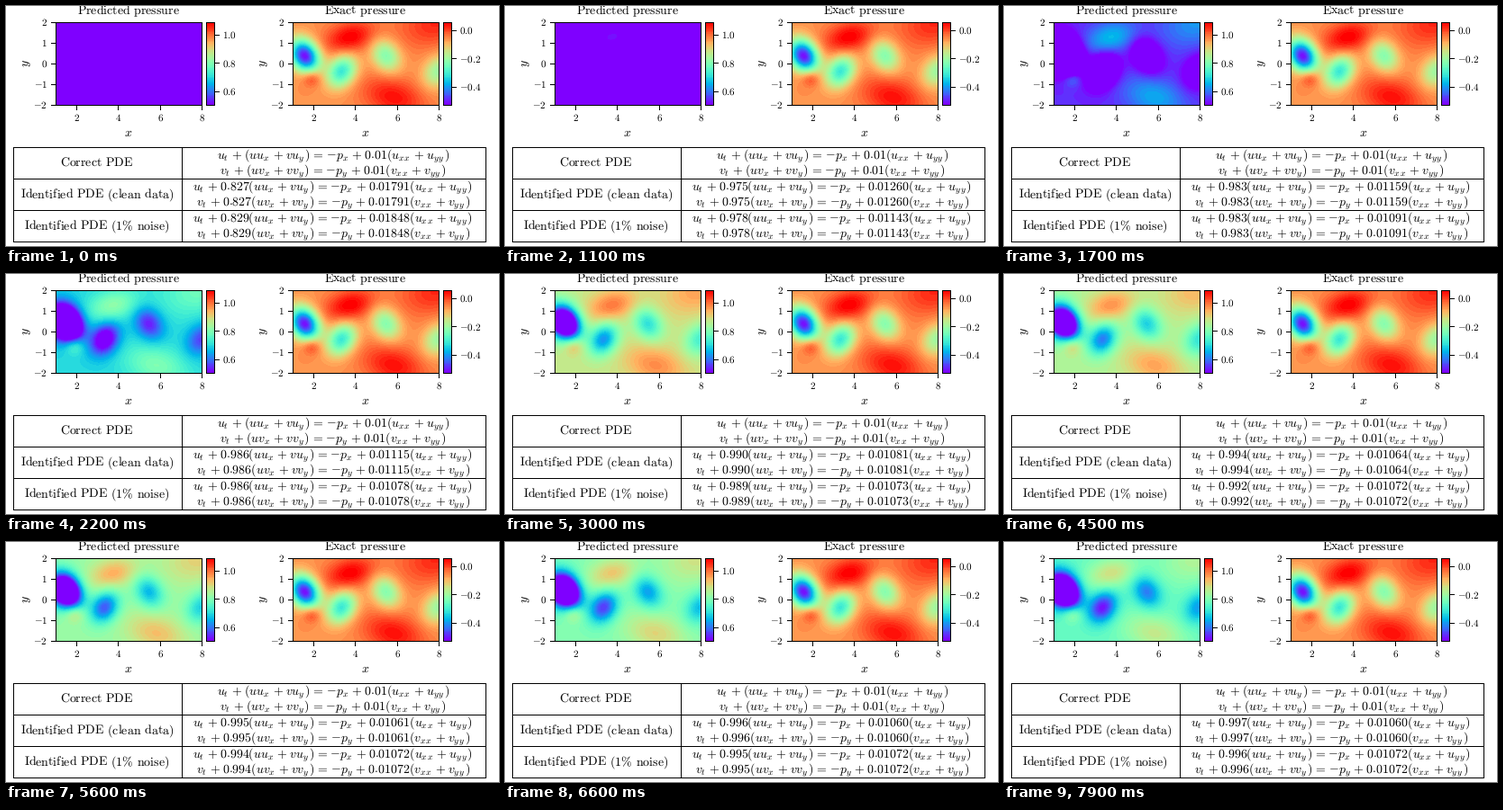
A matplotlib script for the animation above (8000 ms loop, 547x267 px).

```python
import numpy as np
import matplotlib.pyplot as plt
from matplotlib.animation import FuncAnimation

W, H, DPI = 547, 267, 100
FRAMES, STEP = 80, 100
BIG, SMALL = 10, 8
LINE = 72 / DPI
SHIFT = 263  # distance between the two panels
LEFT, RIGHT, TOP, BOTTOM = 55, 217, 18, 110
ROW = 35

plt.rcParams.update({"mathtext.fontset": "cm", "text.hinting": "no_hinting"})
fig = plt.figure(figsize=(W / DPI, H / DPI), dpi=DPI, facecolor="white")
ax = fig.add_axes([0, 0, 1, 1])
rainbow = plt.get_cmap("rainbow", 50)
x, y = np.meshgrid(np.linspace(1, 8, RIGHT - LEFT),
                   np.linspace(2, -2, BOTTOM - TOP))


def label(px, py, s, size=BIG, ha="center", va="baseline", **kw):
    return ax.text(px, py, f"${s}$", size=size, ha=ha, va=va, **kw)


def gap(em):
    # mathtext measures spaces by the width of an italic m
    return rf"\hspace{{{em / 0.878:.3f}}}"


def roman(s):
    return r"\mathrm{" + s.replace(" ", gap(1 / 3)).replace("%", r"\%") + "}"


def line(x0, y0, x1, y1):
    ax.plot([x0, x1], [y0, y1], color="black", lw=LINE,
            solid_capstyle="projecting", zorder=3)


def box(x0, y0, x1, y1):
    for px in (x0, x1):
        line(px, y0, px, y1)
    for py in (y0, y1):
        line(x0, py, x1, py)


def image(data, x0, x1):
    return ax.imshow(data, cmap=rainbow, vmin=0, vmax=1, aspect="auto",
                     interpolation="nearest",
                     extent=(x0 + .5, x1 + .5, BOTTOM + .5, TOP + .5))


def blob(cx, cy, sx, sy, lean=0):
    u = (x - cx - lean * (y - cy)) / sx
    return np.exp(-0.5 * (u ** 2 + ((y - cy) / sy) ** 2))


def wake():
    """Vortex street scaled to 0..1: alternating lows with highs between."""
    p = np.full_like(x, 0.8) + 0.15 * blob(1.85, -0.7, 0.33, 0.3)
    for k in range(4):
        side = (-1) ** k
        p -= ((0.2 + 0.58 * 0.4 ** k)
              * blob(1.52 + 1.6 * k + 0.18 * k * k, 0.38 * side,
                     0.48, 0.55, -0.2 * side))
    for k in range(3):
        side = (-1) ** k
        p += ((0.205 - 0.03 * k)
              * blob(3.7 + 2.1 * k, side * (1.27 + 0.37 * k),
                     0.8 + 0.2 * k, 0.55 + 0.15 * k, 0.4 * side))
    return p


def panel(dx, title, data, bar_top, bar_first):
    l, r = LEFT + dx, RIGHT + dx
    field = image(data, l, r)
    box(l, TOP, r, BOTTOM)
    mid = (l + r) / 2
    label(mid, 9, roman(title))
    label(mid, 145, "x")
    label(l - 33, (TOP + BOTTOM) / 2, "y", va="center", rotation=90)
    for v in (2, 4, 6, 8):
        px = l + (v - 1) * (r - l) / 7
        line(px, BOTTOM, px, BOTTOM + 5)
        label(px + .5, 128, v, SMALL)
    for v in range(-2, 3):
        py = TOP + (2 - v) * (BOTTOM - TOP) / 4
        line(l - 5, py, l, py)
        label(l - 9, py + 4, v, SMALL, ha="right")

    b0, b1 = r + 5, r + 14
    image(np.linspace(1, 0, BOTTOM - TOP)[:, None], b0, b1)
    box(b0, TOP, b1, BOTTOM)
    for k in range(3):
        py = bar_first + 31.3 * k
        line(b1, py, b1 + 5, py)
        label(b1 + 9, py + 4, f"{bar_top - 0.2 * k:.1f}", SMALL, ha="left")
    return field


def sub(s):
    return "_{" + gap(0.08).join(s) + gap(0.11) + "}"


def equation(c, d, a, b):
    s = (f"{c}{sub('t')} + {a}(u{c}{sub('x')} + v{c}{sub('y')}) = "
         f"{{-}}p{sub(d)} + {b}({c}{sub('xx')} + {c}{sub('yy')})")
    for op, em in (("+", 0.046), ("=", 0.102)):
        s = s.replace(f" {op} ", gap(em) + op + gap(em))
    return s


def row(i, name):
    py = 157 + ROW * i
    label(100.8, py + 21.3, roman(name))
    return [label(363, py + dy, "") for dy in (12.5, 29.3)]


def fill(texts, a, b):
    for t, c, d in zip(texts, "uv", "xy"):
        t.set_text(f"${equation(c, d, a, b)}$")


exact = wake()
inlet = exact - 0.35 * blob(1.1, 0.55, 0.6, 0.65)
predicted = panel(0, "Predicted pressure", inlet, 1.0, 32)
panel(SHIFT, "Exact pressure", exact, 0.0, 27)

box(8, 157, 532, 157 + 3 * ROW)
line(195, 157, 195, 157 + 3 * ROW)
for i in (1, 2):
    line(8, 157 + ROW * i, 532, 157 + ROW * i)
fill(row(0, "Correct PDE"), "", "0.01")
clean = row(1, "Identified PDE (clean data)")
noisy = row(2, "Identified PDE (1% noise)")

ax.set(xlim=(0, W), ylim=(H, 0))
ax.axis("off")


def offset(i):
    """Smooth rise of the pressure level, then a slow drift down."""
    s = np.clip((i - 8) / 24, 0, 1)
    return -1.01 + 0.86 * s * s * (3 - 2 * s) - 0.0042 * max(i - 32, 0)


def settle(i, start, end, tau):
    return end + (start - end) * np.exp(-i / tau)


def update(i):
    predicted.set_data(inlet + offset(i))
    # advection tends to 1 like 1/i, viscosity decays exponentially
    fill(clean, f"{1 - 0.173 / (1 + 0.526 * i + 2.2e-5 * i ** 3):.3f}",
         f"{settle(i, 0.01791, 0.0106, 8.5):.5f}")
    fill(noisy, f"{1 - 0.171 / (1 + i * settle(i, 1.03, 0.47, 8.3)):.3f}",
         f"{settle(i, 0.01848, 0.01072, 4.6):.5f}")
    return [predicted, *clean, *noisy]


anim = FuncAnimation(fig, update, frames=FRAMES, interval=STEP,
                     repeat=True, repeat_delay=0, blit=False)
plt.show()
```
